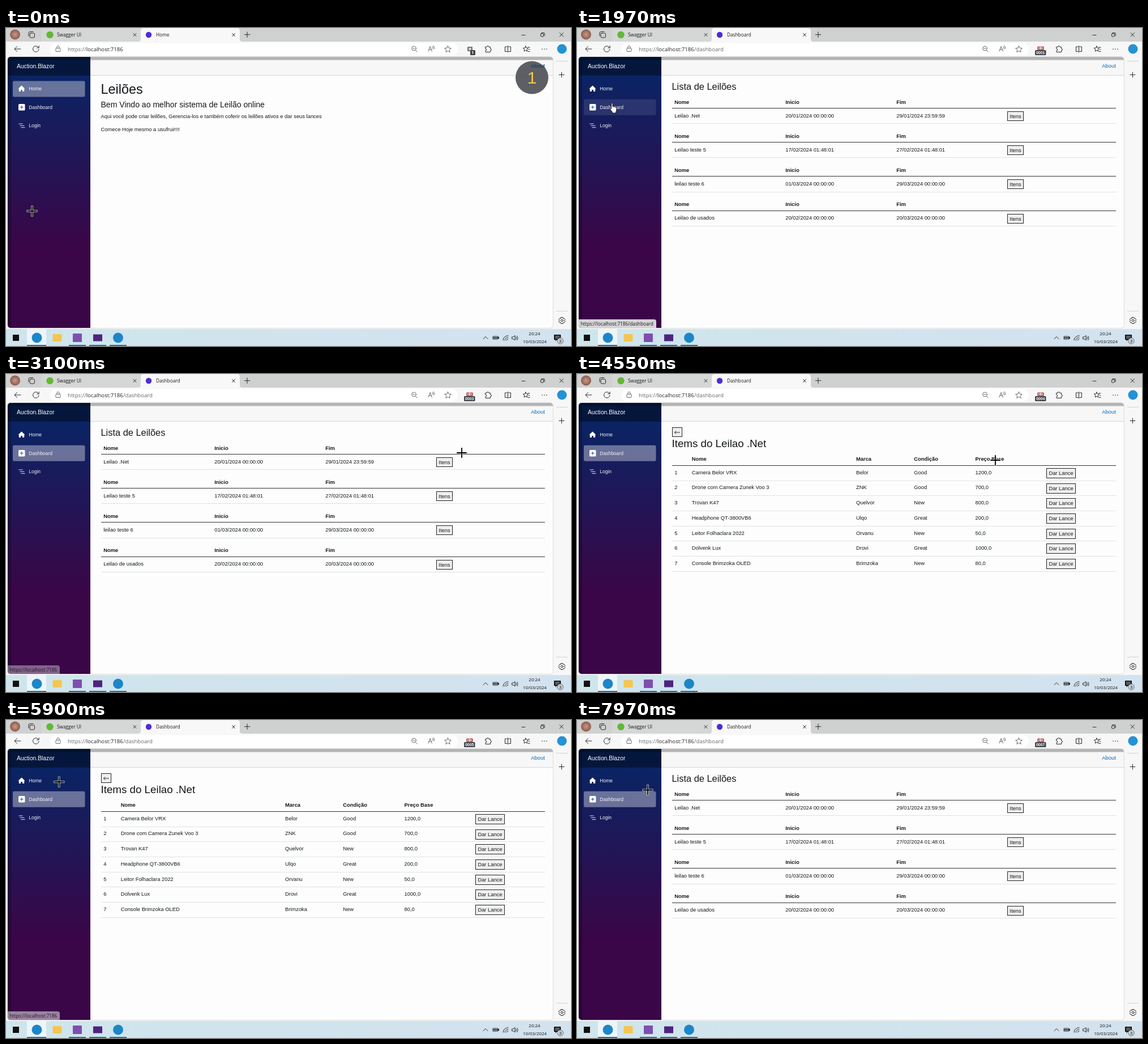
Animation of 998x561 px, one loop 8 s. Source, as an HTML page:

```html
<!DOCTYPE html>
<html lang="pt">
<head>
<meta charset="utf-8">
<title>Auction.Blazor</title>
<style>
html, body { margin: 0; width: 100%; height: 100%; overflow: hidden; background: #f7f7f7; }
#stage { display: block; width: 998px; height: 561px; }
text { font: 9.37px "Liberation Sans", Arial, sans-serif; fill: #14181b; white-space: pre; }
.ui text, text.ui { font: 8.25px "Open Sans", "Noto Sans", sans-serif; fill: #1a1a1a; }
.ui text.url { font-size: 9.65px; fill: #666; }
.url tspan { fill: #222; }
.ui text.clock { font-size: 7.95px; text-anchor: middle; fill: #111; }
.nav text { font-size: 8.5px; fill: #f4f4f8; }
text.brand { font-size: 10.3px; fill: #fff; }
.h1 { font-size: 23.4px; } .h2 { font-size: 18.75px; } .h3 { font-size: 16.4px; } .h4 { font-size: 14.05px; }
.b { font-weight: bold; }
.icon { fill: none; stroke: #2a2a2a; stroke-width: 1; stroke-linecap: round; stroke-linejoin: round; }
.btn { fill: #efefef; stroke: #222; stroke-width: 1; }

/* All parts share one 8 s clock; 1% is 80 ms. */
.home, .dash, .list, .items, .rec, .idle, .hand, .cross, .pill, .digits, .tip-dash { animation: 8s step-end infinite; }
.home { animation-name: home; } .dash { animation-name: dash; }
.list { animation-name: list; } .items { animation-name: items; }
.idle { animation-name: idle; } .rec { animation-name: rec; }
.hand { animation-name: hand; } .cross { animation-name: cross; }
.pill { fill: #fff; } .pill.one { animation-name: pill-one; } .pill.two { animation-name: pill-two; }
.digits { animation-name: digits; }
.tip-dash { animation-name: tip-dash; }
.tip-home { animation: tip-home 8s linear infinite; }
.count { animation: count 8s linear infinite; }
.cursor { animation: move 8s ease-in-out infinite; }

@keyframes home { 0% { opacity: 1 } 22%, 100% { opacity: 0 } }
@keyframes dash { 0% { opacity: 0 } 22%, 100% { opacity: 1 } }
@keyframes list { 0% { opacity: 0 } 22% { opacity: 1 } 50% { opacity: 0 } 88%, 100% { opacity: 1 } }
@keyframes items { 0% { opacity: 0 } 50% { opacity: 1 } 88%, 100% { opacity: 0 } }
@keyframes idle { 0% { opacity: 1 } 7.75%, 100% { opacity: 0 } }
@keyframes rec { 0% { opacity: 0 } 7.75%, 100% { opacity: 1 } }
@keyframes hand {
  0% { opacity: 0 } 20.4% { opacity: 1 } 32% { opacity: 0 } 41.5% { opacity: 1 } 53.2% { opacity: 0 }
  68.2% { opacity: 1 } 73.5% { opacity: 0 } 75.5% { opacity: 1 } 94.2%, 100% { opacity: 0 }
}
@keyframes cross {
  0% { opacity: 1 } 20.4% { opacity: 0 } 32% { opacity: 1 } 41.5% { opacity: 0 } 53.2% { opacity: 1 }
  68.2% { opacity: 0 } 73.5% { opacity: 1 } 75.5% { opacity: 0 } 94.2%, 100% { opacity: 1 }
}
@keyframes pill-one {
  0% { opacity: .37 } 22% { opacity: 0 } 29.4% { opacity: .1 } 32% { opacity: 0 }
  67.2% { opacity: .1 } 73.5%, 100% { opacity: 0 }
}
@keyframes pill-two { 0% { opacity: 0 } 20.4% { opacity: .1 } 29.4%, 100% { opacity: .37 } }
@keyframes digits {
  0% { transform: translateY(0) } 11.62% { transform: translateY(-9px) } 28% { transform: translateY(-18px) }
  38.37% { transform: translateY(-27px) } 53% { transform: translateY(-36px) } 62.1% { transform: translateY(-45px) }
  80.1% { transform: translateY(-54px) } 93.5%, 100% { transform: translateY(-63px) }
}
@keyframes tip-dash { 0% { opacity: 0 } 21% { opacity: 1 } 30%, 100% { opacity: 0 } }
@keyframes tip-home {
  0%, 30% { opacity: 0 } 30.1%, 37.8% { opacity: 1 } 39.6%, 69% { opacity: 0 }
  70%, 73% { opacity: 1 } 75%, 100% { opacity: 0 }
}
@keyframes count { 0%, .375% { opacity: 1 } 3%, 100% { opacity: 0 } }
@keyframes move {
  0%, 11.6% { transform: translate(46px, 323px) }
  21.5%, 28% { transform: translate(64px, 141px); animation-timing-function: ease-in }
  30.5% { transform: translate(76px, 112px); animation-timing-function: ease-out }
  38.75% { transform: translate(805px, 139px) }
  42.6%, 53% { transform: translate(775px, 157px) }
  56.87%, 62.1% { transform: translate(739px, 152px) }
  67.62% { transform: translate(29.5px, 124px) }
  69.5%, 72.3% { transform: translate(60px, 110px) }
  76.3%, 93.5% { transform: translate(181px, 107px) }
  99.6%, 100% { transform: translate(125px, 123.5px) }
}
</style>
</head>
<body>
<svg id="stage" viewBox="0 0 998 561">
  <defs>
    <linearGradient id="side" x1="0" y1="0" x2="0" y2="1">
      <stop offset="0" stop-color="#052767"/><stop offset=".7" stop-color="#3a0647"/>
    </linearGradient>
    <linearGradient id="bar"><stop stop-color="#cfe5ec"/><stop offset="1" stop-color="#d3e2ef"/></linearGradient>
    <radialGradient id="face"><stop stop-color="#c99a86"/><stop offset="1" stop-color="#8a5a4c"/></radialGradient>
    <clipPath id="page"><rect x="3" y="51" width="963" height="478" rx="5"/></clipPath>
  </defs>

  <g class="ui">
    <rect width="998" height="561" fill="#f7f7f7"/>
    <rect width="998" height="24" fill="#cfd0d0"/>
    <path d="M62 24V5q0-5 5-5H238V24z" fill="#d5d6d6"/>
    <path d="M234 24q4 0 4-4V5q0-5 5-5H408q5 0 5 5V20q0 4 4 4z" fill="#f8f8f8"/>
    <circle cx="16" cy="11.500" r="9" fill="url(#face)"/>
    <g class="icon">
      <rect x="42" y="9" width="8.500" height="8" rx="2"/><path d="M40 14V9q0-2.500 2.500-2.500H48"/>
      <path d="M225 9.500l5 5m0-5l-5 5M399.500 9.500l5 5m0-5l-5 5M426 7v9.500M421.300 11.700h9.500"/>
      <path d="M911 12.500h6M978 8.500l6.500 6.500m0-6.500l-6.500 6.500"/>
      <rect x="944.500" y="10" width="5" height="5" rx="1"/><path d="M946 8.500h4q1.200 0 1.200 1.200v4"/>
    </g>
    <circle cx="77.500" cy="12" r="6.200" fill="#62b832"/>
    <circle cx="252" cy="12" r="5.200" fill="#512bd4"/>
    <text x="90" y="15">Swagger UI</text>
    <text x="265" y="15" class="home">Home</text>
    <text x="265" y="15" class="dash">Dashboard</text>

    <rect x="78" y="26.500" width="720" height="22" rx="11" fill="#fff"/>
    <g class="icon">
      <path d="M26 37H15m4.500-4.500L15 37l4.500 4.500"/>
      <path d="M57.500 34.500a5.300 5.300 0 1 0 .6 3M58.200 31.500v3.500h-3.500"/>
      <g stroke="#666">
        <rect x="88" y="35.500" width="8" height="6" rx="1"/><path d="M90 35.500v-2a2 2 0 0 1 4 0v2M92 38.200v.6"/>
        <circle cx="720.500" cy="36" r="3.800"/><path d="M723.300 39l3.200 3.200M719 36h3"/>
        <path d="M746 41l3.200-8.500L752.400 41M747.200 38h4M753 32.500q2 2 1 4M755 31q2.500 3 1.200 6"/>
        <path d="M780.500 31.500l1.800 3.700 4 .5-3 2.800.8 4-3.600-2-3.600 2 .8-4-3-2.800 4-.5z"/>
      </g>
      <path d="M847 33.500h2.500q0-2 1.600-2t1.600 2h2.800v3q2 0 2 1.600t-2 1.600v2.800H847v-2.800q2 0 2-1.600t-2-1.600z"/>
      <path d="M885 33h-3.500v8.500H885M888 33h3.500v8.500H888M886.500 31.500v11.500"/>
      <path d="M918 32l1.300 3 3.300.4-2.500 2.300.7 3.300-2.800-1.600-2.900 1.600.7-3.300-2.500-2.300 3.300-.4zM922 34h3M923 38h2M922 41.500h3"/>
      <path d="M947 37.300h.1M951 37.300h.1M955 37.300h.1" stroke-width="1.600"/>
    </g>
    <text x="109" y="40.800" class="url">https://<tspan>localhost:7186</tspan></text>
    <text x="207" y="40.800" class="url dash">/dashboard</text>

    <g class="idle">
      <rect x="815" y="33" width="9" height="8" rx="1" fill="#777"/><circle cx="819.500" cy="37" r="2.300" fill="#ddd"/>
      <rect x="820" y="39" width="9" height="9" rx="1.500" fill="#444"/>
      <text x="822.300" y="46.200" style="font-weight:bold;font-size:7px;fill:#fff">1</text>
    </g>
    <g class="rec">
      <rect x="813" y="32.500" width="12" height="6.500" rx="1" fill="#c6686b"/>
      <path d="M815 35.500h8M819 33v5" stroke="#eed" stroke-width="1.200"/>
      <rect x="809" y="39" width="19.500" height="9" rx="1.500" fill="#40464c"/>
      <svg x="809" y="39" width="20" height="9"><g class="digits" id="digits"></g></svg>
    </g>

    <circle cx="982" cy="37" r="8.500" fill="#2492d5"/>
    <path d="M972 58.500h20M972 499.500h20" stroke="#d2d2d2"/>
    <g class="icon">
      <path d="M981.500 78v9M977 82.500h9"/>
      <circle cx="982" cy="516" r="1.900"/>
      <path d="M980.500 510.500h3l.5 1.700 1.700-.4 1.900 2.600-1.200 1.600 1.200 1.600-1.900 2.600-1.700-.4-.5 1.700h-3l-.5-1.700-1.700.4-1.900-2.600 1.200-1.600-1.200-1.600 1.900-2.600 1.700.4z"/>
    </g>
  </g>

  <rect x="3" y="51" width="963" height="478" rx="5" fill="none" stroke="#dcdcdc" stroke-width="2"/>
  <g clip-path="url(#page)">
    <rect x="3" y="51" width="963" height="478" fill="#fdfdfd"/>
    <rect x="149" y="51" width="817" height="33" fill="#f7f7f7"/>
    <path d="M149 83.500h817" stroke="#d6d5d5"/>
    <text x="927.300" y="70.300" style="fill:#006bb7">About</text>

    <rect x="3" y="51" width="146" height="478" fill="url(#side)"/>
    <rect x="3" y="51" width="146" height="33" fill="#000" opacity=".4"/>
    <path d="M3 51H966v5.500H9V529H3z" opacity=".27"/>
    <text x="19" y="71" class="brand">Auction.Blazor</text>
    <rect class="pill one" x="12" y="93.500" width="127.500" height="28" rx="2.500"/>
    <rect class="pill two" x="12" y="125.800" width="127.500" height="28" rx="2.500"/>
    <g class="nav">
      <path d="M27.500 101.500l6 5.700h-1.300v4.800h-3.200v-3h-3v3h-3.200v-4.800h-1.300z" fill="#fff"/>
      <rect x="22" y="134" width="11.500" height="11.500" rx="1.500" fill="#fff"/>
      <path d="M27.700 137v5.500M25 139.800h5.500" stroke="#27427c"/>
      <path d="M22.500 169h7M24.500 172.300h8M26.500 175.600h7" stroke="#e4e4ea"/>
      <text x="40.300" y="110.200">Home</text>
      <text x="40.300" y="142.700">Dashboard</text>
      <text x="40.300" y="175.200">Login</text>
    </g>

    <g class="home">
      <text x="167.500" y="116.200" class="h1">Leilões</text>
      <text x="167.500" y="140.200" class="h4">Bem Vindo ao melhor sistema de Leilão online</text>
      <text x="167.500" y="158.500">Aqui você pode criar leilões, Gerencia-los e também coferir os leilões ativos e dar seus lances</text>
      <text x="167.500" y="181.800">Comece Hoje mesmo a usufruir!!!</text>
    </g>
    <g class="list" id="list"><text x="167.500" y="109" class="h3">Lista de Leilões</text></g>
    <g class="items" id="items">
      <rect class="btn" x="168.500" y="94.500" width="17" height="16"/>
      <path class="icon" d="M181.500 103h-9m2.500-2.500l-2.500 2.500 2.500 2.500"/>
      <text x="167.500" y="128.700" class="h2">Items do Leilao .Net</text>
    </g>
    <g class="tip-dash">
      <path d="M3 514H136q4 0 4 4v11H3z" fill="#d4d4d6"/>
      <text class="ui" x="6.500" y="524.500">https://localhost:7186/dashboard</text>
    </g>
    <g class="tip-home">
      <path d="M3 514H91q4 0 4 4v11H3z" fill="#d4d4d6"/>
      <text class="ui" x="6.500" y="524.500">https://localhost:7186</text>
    </g>
  </g>

  <g class="ui">
    <rect y="531" width="998" height="30" fill="url(#bar)"/>
    <rect x="37" y="531" width="34" height="30" fill="#edf5f8"/>
    <rect x="12" y="541" width="11" height="11" fill="#111"/>
    <circle cx="54.500" cy="546.500" r="9" fill="#1c86c8"/>
    <rect x="82.500" y="540" width="16" height="13" rx="1" fill="#f3c650"/>
    <rect x="118" y="539" width="16" height="15" rx="1" fill="#7f4fae"/>
    <rect x="154" y="540.500" width="16" height="12" fill="#4e247c"/>
    <circle cx="198" cy="546.500" r="9" fill="#1c86c8"/>
    <path d="M37 560h34M111 560h30M147 560h30M183 560h30" stroke="#0a75cc" stroke-width="2"/>
    <g class="icon">
      <path d="M843 548.500l4-4 4 4"/>
      <rect x="860.500" y="544" width="8" height="5"/><path d="M861 546.500h6M870 545.500v2" stroke-width="2"/>
      <path d="M878 551q0-7 9-8.500M881 551q0-4 6-5.500M884 551q0-2 3-2.500"/>
      <path d="M894 545h2l3-2.500v8.500l-3-2.500h-2zM901 545q1.500 1.500 0 4M903 543.500q2.500 3 0 7"/>
    </g>
    <text x="933.500" y="542" class="clock">20:24</text>
    <text x="934" y="556" class="clock">10/03/2024</text>
    <path d="M968 541h12v9h-7l-2.500 2.500V550H968z" fill="#111"/>
    <path d="M970 543.500h8M970 545.500h8M970 547.500h5" stroke="#d3e2ef" stroke-width=".7"/>
    <circle cx="979" cy="552" r="5.300" fill="#c9d2d8" stroke="#444" stroke-width=".7"/>
    <text x="979" y="555" class="clock">3</text>
  </g>

  <g class="count">
    <circle cx="929" cy="87.500" r="29" fill="#505257" opacity=".92"/>
    <text x="929" y="98" text-anchor="middle" style="font-size:30px;fill:#f6cb3c">1</text>
    <text x="927.300" y="70.300" style="fill:#0b3f66">About</text>
  </g>

  <g class="cursor">
    <g class="cross">
      <path d="M-9.500 0h19M0-9.500v19" stroke="#e4ebdc" stroke-width="3.400"/>
      <path d="M-8.700 0h17.400M0-8.700v17.400" stroke="#050505" stroke-width="1.800"/>
    </g>
    <path class="hand" d="M-3.200-8q1.400-1.200 2.300.4V-2q1.500-1 2.200.3 1.500-.8 2.200.5 2-.7 2.300 1.200V4q0 2-1.200 3.200V9h-6V7.500Q-3.500 5-5.800 1.600-5.500-.3-3.200 1.200z" fill="#fff" stroke="#111" stroke-width=".9"/>
  </g>
</svg>
<script>
const svgNs = "http://www.w3.org/2000/svg";

function add(parent, tag, attrs, content = "") {
  const el = parent.appendChild(document.createElementNS(svgNs, tag));
  for (const name in attrs) el.setAttribute(name, attrs[name]);
  el.textContent = content;
}

function addRow(parent, columns, y, cells, cls = "") {
  cells.forEach((cell, i) => add(parent, "text", { x: columns[i], y, class: cls }, cell));
}

function addLine(parent, y, stroke) {
  add(parent, "path", { d: `M168 ${Math.floor(y) + .5}h784`, stroke });
}

function addButton(parent, x, y, width, height, label) {
  const top = Math.round(y);
  add(parent, "rect", { class: "btn", x: x + .5, y: top + .5, width, height });
  add(parent, "text", { x: x + width / 2 + .5, y: top + height / 2 + 3.7, "text-anchor": "middle" }, label);
}

const digits = document.getElementById("digits");
for (let n = 0; n < 8; n++) {
  add(digits, "text", { x: 1.9, y: 7.1 + 9 * n, style: "font:bold 7px 'Liberation Sans',sans-serif;fill:#fff" }, `000${n}`);
}

const list = document.getElementById("list");
const listColumns = [172.2, 368.2, 564.2];
[
  ["Leilao .Net", "20/01/2024 00:00:00", "29/01/2024 23:59:59"],
  ["Leilao teste 5", "17/02/2024 01:48:01", "27/02/2024 01:48:01"],
  ["leilao teste 6", "01/03/2024 00:00:00", "29/03/2024 00:00:00"],
  ["Leilao de usados", "20/02/2024 00:00:00", "20/03/2024 00:00:00"]
].forEach((cells, i) => {
  const top = 60.1 * i;
  addRow(list, listColumns, 133.5 + top, ["Nome", "Inicio", "Fim"], "b");
  addLine(list, 141.7 + top, "#333");
  addRow(list, listColumns, 157.7 + top, cells);
  addButton(list, 760, 147.2 + top, 28, 16, "Itens");
  addLine(list, 168.8 + top, "#dee2e6");
});

const items = document.getElementById("items");
const itemColumns = [172.2, 202.7, 493, 595.3, 703.5];
addRow(items, itemColumns, 152.8, ["", "Nome", "Marca", "Condição", "Preço Base"], "b");
addLine(items, 161.5, "#333");
[
  ["Camera Belor VRX", "Belor", "Good", "1200,0"],
  ["Drone com Camera Zunek Voo 3", "ZNK", "Good", "700,0"],
  ["Trovan K47", "Quelvor", "New", "800,0"],
  ["Headphone QT-3800VB6", "Ulqo", "Great", "200,0"],
  ["Leitor Folhaclara 2022", "Orvanu", "New", "50,0"],
  ["Dolvenk Lux", "Drovi", "Great", "1000,0"],
  ["Console Brimzoka OLED", "Brimzoka", "New", "80,0"]
].forEach((cells, i) => {
  const top = 26.68 * i;
  addRow(items, itemColumns, 176.8 + top, [i + 1, ...cells]);
  addButton(items, 829, 166 + top, 51, 17, "Dar Lance");
  addLine(items, 188 + top, "#dee2e6");
});
</script>
</body>
</html>
```
